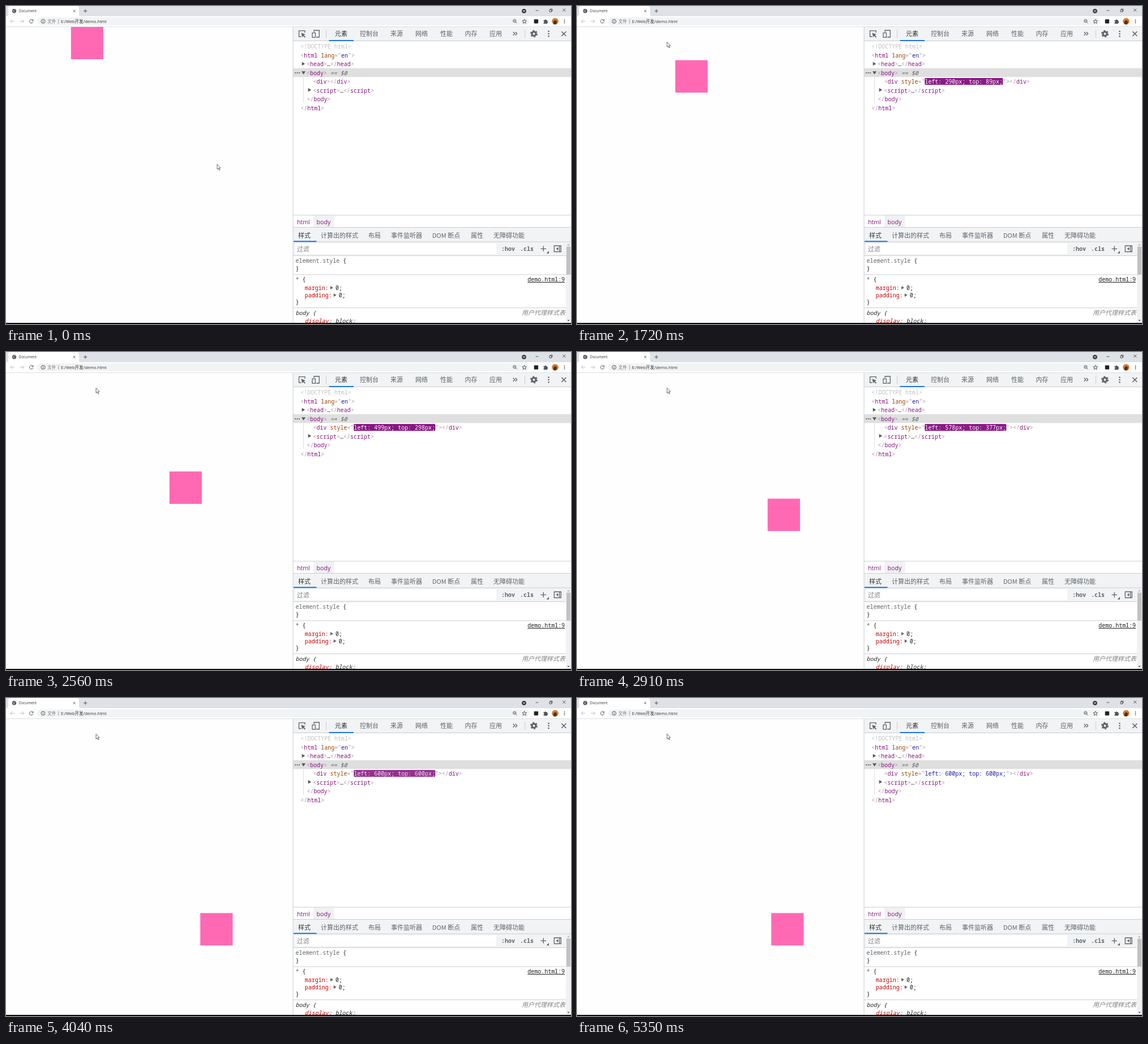
An HTML page that plays this animation: 998 by 561 pixels, repeating every 5.61 s.

```html
<!DOCTYPE html>
<html lang="zh">
<head>
<meta charset="utf-8">
<title>Moving box</title>
<style>
html, body { margin: 0; width: 100%; height: 100%; overflow: hidden; background: #fefefe; }
svg { display: block; }
text { white-space: pre; }
.ui { font: 11px "Noto Sans CJK SC", "Noto Sans CJK", sans-serif; fill: #5f6368; }
.bar { font: 7.5px "Open Sans", "Noto Sans CJK SC", sans-serif; fill: #333; }
.crumb { font: 10.6px "Open Sans", sans-serif; fill: #881280; }
.mono { font: 9.97px "Noto Sans Mono", "DejaVu Sans Mono", monospace; fill: #222; }
.bold { font-weight: 600; }
.it { font-style: italic; }
.grey { fill: #5f6368; }
.pale { fill: #808080; }
.red { fill: #c80000; }
.tag { fill: #881280; }
.br { fill: #a894a6; }
.attr { fill: #994500; }
.val { fill: #1a1aa6; }
.on { fill: #333; }
.ico { fill: none; stroke: #5f6368; stroke-width: 1.3; }
.thin { fill: none; stroke: #444; stroke-width: .9; }
.rule { stroke: #cacdd1; stroke-width: 1; }
</style>
</head>
<body>
<svg width="998" height="561" viewBox="0 0 998 561">
  <!-- page -->
  <rect width="998" height="561" fill="#fefefe"/>
  <rect id="box" width="57.2" height="57.2" fill="#ff69b4"/>

  <!-- tab strip -->
  <rect width="998" height="18" fill="#dee1e6"/>
  <path d="M1 18q3 0 3-3V4q0-4 4-4H125q4 0 4 4V15q0 3 3 3z" fill="#fff"/>
  <circle cx="14.5" cy="8.8" r="3.7" fill="#50555a"/>
  <path d="M12 8l2 1 1 2M14.5 6l2 1.5" stroke="#fff" fill="none" stroke-width=".9"/>
  <text class="bar" x="22.8" y="11.4" style="font-size:6.4px">Document</text>
  <path class="thin" d="M118.7 7l3.6 3.6m0-3.6l-3.6 3.6M137 8.8h6.4m-3.2-3.2v6.4"/>
  <circle cx="915" cy="8.8" r="3.9" fill="#3c4043"/>
  <path d="M913.2 8h3.6l-1.8 2.2z" fill="#fff"/>
  <path class="thin" d="M935.5 8h5M960 6.7h3.6v3.6h-3.6zM961.3 6.5v-1.2h3.6v3.7h-1.2M983.3 4.7l5 5m0-5l-5 5"/>

  <!-- address bar -->
  <rect y="18" width="998" height="18.5" fill="#fff"/>
  <rect x="55" y="20" width="869" height="14" rx="7" fill="#f1f3f4"/>
  <path class="rule" d="M0 36.5H998" style="stroke:#dcdee1"/>
  <path class="thin" d="M14.8 27h-7m3.2-3.2L7.8 27l3.2 3.2M24.5 27h7m-3.2-3.2l3.2 3.2-3.2 3.2" style="stroke:#b5b8bc"/>
  <path class="thin" d="M47.3 25a3.2 3.2 0 1 0 .7 2.5M48 23.5v2.3h-2.3"/>
  <circle class="thin" cx="65.5" cy="27" r="3.5"/>
  <path class="thin" d="M65.5 26.5v2.6m0-4.3v1"/>
  <text class="bar" x="73.3" y="29.7" style="fill:#777">文件</text>
  <path d="M92.8 23v8" stroke="#888" stroke-width=".8"/>
  <text class="bar" x="97" y="29.7">E:/Web开发/demo.html</text>
  <circle class="thin" cx="898.3" cy="26.3" r="2.6"/>
  <path class="thin" d="M900.2 28.2l2.3 2.3M897 26.3h2.6"/>
  <path class="thin" d="M915.7 23.3l1.1 2.5 2.7.2-2.1 1.8.7 2.7-2.4-1.5-2.4 1.5.7-2.7-2.1-1.8 2.7-.2z"/>
  <rect x="932.7" y="23.5" width="7.4" height="7.2" rx="1" fill="#222"/>
  <path d="M949.5 25h2a1.3 1.3 0 0 1 2.6 0h2v2a1.3 1.3 0 0 1 0 2.6v1.6h-6.6v-2a1.2 1.2 0 0 0 0-2.4z" fill="#50555a"/>
  <circle cx="970" cy="27" r="5.8" fill="#d9792b"/>
  <path d="M967 32q-1-5 2-6.5 3-1 4 2 .5 3-2 5z" fill="#4a3020"/>
  <g fill="#50555a"><circle cx="986.5" cy="24.3" r=".9"/><circle cx="986.5" cy="27" r=".9"/><circle cx="986.5" cy="29.7" r=".9"/></g>

  <!-- developer panel -->
  <rect x="507" y="37" width="491" height="522" fill="#fff"/>
  <rect x="507" y="37" width="491" height="24.5" fill="#f1f3f4"/>
  <path class="rule" d="M507 61.5H998M565.5 42V56M916.5 42V56"/>
  <path class="ico" d="M521.5 54h-4V43.7h10.5V47"/>
  <path d="M521.3 47.3l7.7 3-3 1.3 3 3-1.2 1.2-3-3-1.3 2.8z" fill="#5f6368"/>
  <path class="ico" d="M544 46v-3h9.3v12H548M541 47.3h5.4v8H541z"/>
  <g id="panels" class="ui"></g>
  <rect x="570.5" y="60" width="43.5" height="2" fill="#1a73e8"/>
  <path class="ico" d="M895.7 45.8l3 3-3 3m4-6l3 3-3 3"/>
  <circle cx="932.5" cy="49" r="3.5" fill="none" stroke="#5f6368" stroke-width="3"/>
  <circle cx="932.5" cy="49" r="5.6" fill="none" stroke="#5f6368" stroke-width="1.8" stroke-dasharray="2.9 2.964"/>
  <g fill="#5f6368"><circle cx="958.5" cy="44.8" r="1.3"/><circle cx="958.5" cy="49" r="1.3"/><circle cx="958.5" cy="53.2" r="1.3"/></g>
  <path class="ico" d="M981.3 45l8 8m0-8l-8 8" style="stroke-width:1.6"/>

  <!-- element tree -->
  <rect x="507" y="109.7" width="491" height="15.6" fill="#dfdfdf"/>
  <path class="rule" d="M525.5 126V171" style="stroke:#ddd"/>
  <g fill="#555"><circle cx="511" cy="118" r="1.1"/><circle cx="514.5" cy="118" r="1.1"/><circle cx="518" cy="118" r="1.1"/>
    <path d="M522.7 98.7l5.4 3.3-5.4 3.3zM522 115.3h7l-3.5 5.4zM533.7 144.7l5.4 3.3-5.4 3.3z"/></g>
  <rect id="glow" x="614.2" y="127" height="12" rx="1.5" fill="#881280"/>
  <g id="tree" class="mono"></g>

  <!-- breadcrumbs and style tabs -->
  <rect x="543" y="369.5" width="36.5" height="21" fill="#eff1f3"/>
  <text class="crumb" x="514" y="384.7">html</text>
  <text class="crumb" x="548.5" y="384.7">body</text>
  <rect x="507" y="390.5" width="491" height="50" fill="#f1f3f4"/>
  <path class="rule" d="M507 369H998M507 390.5H998M507 416H998M507 440.5H998M507 474H989M507 532.5H989M507 37V559"/>
  <g id="panes" class="ui"></g>
  <rect x="508" y="414.3" width="40.5" height="2" fill="#1a73e8"/>
  <rect x="511" y="418.5" width="355" height="19" fill="#fff"/>
  <text class="ui pale" x="513.7" y="432.7">过滤</text>
  <g class="mono bold"><text x="875" y="431.7" class="grey">:hov</text><text x="908" y="431.7" class="grey">.cls</text></g>
  <path class="ico" d="M944.5 428.3h9.6m-4.8-4.8v9.6M968.3 423h12v10.5h-12zM977.7 423v10.5"/>
  <path d="M959 432v4.5h-4.5zM975.5 425.5v5.5l-4-2.75z" fill="#5f6368"/>

  <!-- style rules -->
  <g class="mono">
    <text x="511.5" y="453"><tspan class="grey">element.style</tspan> {</text>
    <text x="511.5" y="467.3">}</text>
    <text x="511.5" y="486"><tspan class="grey">*</tspan> {</text>
    <text x="527.8" y="500.5" class="red">margin:</text><text x="582" y="500.5">0;</text>
    <text x="527.8" y="513.5" class="red">padding:</text><text x="587.7" y="513.5">0;</text>
    <text x="511.5" y="526.3">}</text>
    <text x="921.3" y="486" text-decoration="underline">demo.html:9</text>
    <text x="511.5" y="544.5" class="it">body {</text>
    <text x="527.8" y="558.5" class="it"><tspan class="red">display</tspan>: block;</text>
  </g>
  <path d="M573 494l5 3-5 3zM578.7 507l5 3-5 3z" fill="#666"/>
  <text class="ui it pale" x="911" y="544.5">用户代理样式表</text>
  <rect x="989" y="417" width="9" height="142" fill="#f1f1f1"/>
  <rect x="990" y="424.5" width="7" height="49.5" fill="#c1c1c1"/>
  <path d="M991.3 422.3l2.2-2.6 2.2 2.6z" fill="#aaa"/>
  <path d="M991.3 553.7l2.2 2.6 2.2-2.6z" fill="#555"/>
  <rect y="559" width="998" height="2" fill="#0c0c0c"/>

  <!-- pointer -->
  <path id="arrow" d="M0 0V8.8L2 7l1.5 3.3 1.4-.6L3.5 6.5H6.1z" fill="#fff" stroke="#444" stroke-width=".8"/>
  <circle id="click" cx="158.5" cy="63.3" r="6.4" fill="#fdb043"/>
</svg>
<script>
const $ = id => document.getElementById(id);
const clamp = (v, lo, hi) => Math.max(lo, Math.min(hi, v));
const span = (cls, s) => `<tspan class="${cls}">${s}</tspan>`;
const open = (name, attrs = '') => span('br', '&lt;') + span('tag', name) + attrs + span('br', '&gt;');
const close = name => span('br', '&lt;/') + span('tag', name) + span('br', '&gt;');
const attr = (name, value) => ' ' + span('attr', name) + span('br', '="') + value + span('br', '"');

// Element tree: indent x and markup for each line
$('tree').innerHTML = [
  [520.3, '<tspan fill="#c0c0c0">&lt;!DOCTYPE html&gt;</tspan>'],
  [520.3, open('html', attr('lang', span('val', 'en')))],
  [531, open('head') + '…' + close('head')],
  [531, open('body') + span('it grey', ' == $0')],
  [542.6, ''],
  [542.2, open('script') + '…' + close('script')],
  [531.5, close('body')],
  [520.3, close('html')]
].map(([x, s], i) => `<text x="${x}" y="${75 + i * 15.5}">${s}</text>`).join('');
const divRow = $('tree').children[4];

const labels = (y, list) => list.map(([x, s], i) =>
  `<text x="${x}" y="${y}" class="${i ? '' : 'on'}">${s}</text>`).join('');
$('panels').innerHTML = labels(53.2, [[581, '元素'], [625, '控制台'], [679, '来源'],
  [723, '网络'], [767, '性能'], [810.5, '内存'], [854, '应用']]);
$('panes').innerHTML = labels(408.7, [[516, '样式'], [556, '计算出的样式'], [640, '布局'],
  [680, '事件监听器'], [753, 'DOM 断点'], [821, '属性'], [861, '无障碍功能']]);

const LOOP = 5610, CLICK = 1220, STEP = 70.48, SPEED = 16.8, FADE = 1430, PITCH = 5.982;

function drawPointer(t) {
  const p = clamp((Math.floor((t - 330) / 70) + 1) / 9, 0, 1);
  const e = p * p * (3 - 2 * p);
  $('arrow').setAttribute('transform', `translate(${373 - 214 * e} ${279.3 - 215.8 * e})`);
  $('click').setAttribute('opacity', t < CLICK ? 0 : clamp(1.3 - (t - CLICK) / 210, 0, .85));
}

// The inspector refreshes about every 26 px of travel, then its highlight fades
function drawInspector(dist) {
  const k = Math.min(20, Math.floor((dist - 89) / 26.2));
  if (k < -3) {
    divRow.innerHTML = open('div') + close('div');
    $('glow').setAttribute('opacity', 0);
    return;
  }
  const top = Math.min(600, Math.floor(89 + 25.92 * k + .0268 * k * k));
  const age = (dist - 89 - 26.2 * k) * STEP / SPEED;
  const p = clamp(age / FADE, 0, 1);
  const mix = c => Math.round(255 + (c - 255) * p);
  const css = `left: ${Math.min(600, 201 + top)}px; top: ${top}px;`;
  const value = `<tspan fill="rgb(${mix(26)},${mix(26)},${mix(166)})">${css}</tspan>`;
  divRow.innerHTML = open('div', attr('style', value)) + close('div');
  $('glow').setAttribute('width', css.length * PITCH + .6);
  $('glow').setAttribute('opacity', 1 - p);
}

function draw(t) {
  const n = Math.floor((t - CLICK + 5) / STEP);
  const dist = 103 + SPEED * (n - 7);
  $('box').setAttribute('x', 114.8 + .571 * clamp(dist, 0, 400));
  $('box').setAttribute('y', 36.8 + .571 * clamp(dist, 0, 600));
  drawPointer(t);
  drawInspector(dist);
}

const start = performance.now();
(function tick() {
  draw((performance.now() - start) % LOOP);
  requestAnimationFrame(tick);
})();
</script>
</body>
</html>
```
